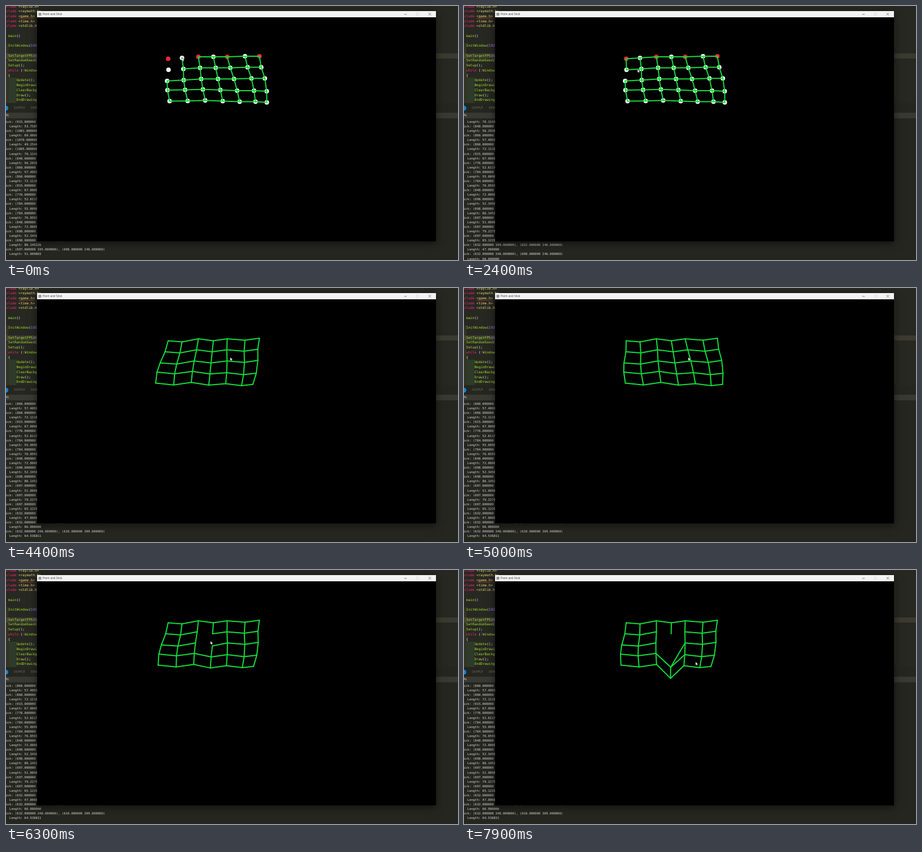
An HTML page with a canvas for the animation above (8 s loop, 800 by 450 pixels).

```html
<!DOCTYPE html>
<html lang="en">
<head>
<meta charset="utf-8">
<title>Point and Stick</title>
<style>
  html, body { margin: 0; width: 100%; height: 100%; overflow: hidden; background: #272822; }
  canvas { display: block; width: 800px; height: 450px; }
</style>
</head>
<body>
<canvas id="stage" width="800" height="450"></canvas>
<script>
const g = document.getElementById('stage').getContext('2d');
const LOOP = 8000, COLS = 7, ROWS = 5, PLAY = 3300;
const MONO = '"DejaVu Sans Mono", "Noto Sans Mono", monospace';
const SANS = '"Open Sans", "Noto Sans", sans-serif';
const WHITE = '#f8f8f2', PINK = '#f92672', YELLOW = '#e6db74', GREEN = '#a6e22e',
      CYAN = '#66d9ef', PURPLE = '#ae81ff';

// Top and bottom edge of the cloth; the rows between are interpolated.
const topX = [287, 311.5, 340.5, 367, 391.5, 423, 448.5];
const topY = [93.5, 92, 90, 90, 90, 89, 89];
const bottomX = [282, 314, 345, 376, 406, 434, 454];

// Sticks drawn by hand: from point, to point, time.
const drawn = [[1, 2, 400], [1, 0, 1000], [0, 7, 1600], [7, 8, 2300], [7, 14, 2950]];
const born = Object.fromEntries(drawn.map(([a, b, t]) => [Math.min(a, b) + '-' + Math.max(a, b), t]));
const cut = { '9-10': 5700, '16-17': 5950, '10-17': 6150, '10-11': 6350 };

// The halves swing together until the cloth is torn.
const swing = [[PLAY, -.45], [4390, 1.02], [5160, -.35], [6090, 1]];
const leftSwing = [...swing, [7050, -1.1], [7890, .25]];
const rightSwing = [...swing, [7050, .5], [7890, 1]];
const settle = [[PLAY, 0], [3600, 1]];
const fall = [[6150, 0], [6950, 1]];
const mouse = [
  ...drawn.flatMap(([a, b, t]) => [[t - 350, ...point(a, 0)], [t, ...point(b, 0)]]),
  [3650, 397, 123], [5200, 397, 123], [5580, 347.5, 110.5], [6100, 360, 130],
  [6950, 375, 101], [7800, 410, 163]];

const early = [[915, 53.758720], [1001, 69], [1070, 49.254441], [1005, 70.114193], [848, 56.293873],
  [860, 57.489129], [860, 72.111026], [915, 67], [776, 52.611786], [784, 55.009090],
  [784, 76.059187], [848, 72], [698, 52.345009]];
const late = [[698, 246, 784, 241], [697, 195, 698, 246], [697, 195, 776, 189], [697, 195, 632, 199],
  [632, 199, 632, 246], [632, 246, 698, 246], [632, 246, 618, 309]];
const six = n => n.toFixed(6);
const log = [
  ...early.flatMap(([x, length]) => [`ick: (${six(x)}`, `  Length: ${six(length)}`]),
  ...late.flatMap(([x, y, u, v]) => [
    `ick: (${six(x)} ${six(y)}), (${six(u)} ${six(v)})`, `  Length: ${six(Math.hypot(u - x, v - y))}`])];

const include = name => [[PINK, '#include '], [YELLOW, `<${name}.h>`]];
const call = (indent, name, rest = '();', number = '') =>
  [[GREEN, ' '.repeat(indent) + name], [WHITE, rest], [PURPLE, number]];
const code = [
  ...['raylib', 'raymath', 'game', 'time', 'stdlib'].map(include), [],
  [[CYAN, 'int '], [GREEN, 'main'], [WHITE, '()']], [],
  call(4, 'InitWindow', '(', '1920'), [],
  call(4, 'SetTargetFPS', '(', '60'), call(4, 'SetRandomSeed', '('), call(4, 'Setup'),
  [[PINK, '    while '], [WHITE, '('], [PINK, '!'], [GREEN, 'Window']],
  [[WHITE, '    {']],
  ...['Update', 'BeginDrawing', 'ClearBackground', 'Draw', 'EndDrawing'].map(name => call(8, name))];

function lerp(a, b, k) {
  return a + (b - a) * k;
}

// Eased value of [time, ...values] keys, held at both ends.
function track(keys, t) {
  const n = keys.findIndex(key => key[0] > t);
  if (n < 1) return keys[n ? keys.length - 1 : 0].slice(1);
  const a = keys[n - 1], b = keys[n];
  const k = (1 - Math.cos(Math.PI * (t - a[0]) / (b[0] - a[0]))) / 2;
  return a.slice(1).map((v, i) => lerp(v, b[i + 1], k));
}

function point(i, t) {
  const c = i % COLS, r = (i - c) / COLS, side = c - 3;
  const [left] = track(leftSwing, t), [right] = track(rightSwing, t);
  const sway = side < 0 ? left : side > 0 ? right : (left + right) / 2;
  const bulge = 1.2 * side * Math.max(0, Math.sin(Math.PI * (r - 1) / 3));
  let x = lerp(topX[c], bottomX[c], r / 4) + bulge - 4.2 * r * sway;
  let y = topY[c] + 19.6 * r + (r > 2 ? 1.1 * side : 0);
  if (c % 2) y += 3.5 * track(settle, t)[0];  // only even columns are pinned
  if (!side && r > 1) {                       // the torn middle drops
    const [k] = track(fall, t);
    y += 20 * k;
    if (r === 2) x += 11 * k;
  }
  return [x, y];
}

function box(x, y, w, h, color) {
  g.fillStyle = color;
  g.fillRect(x, y, w, h);
}

function text(s, x, y, color, font) {
  g.font = font;
  g.fillStyle = color;
  g.fillText(s, x, y);
  return x + g.measureText(s).width;
}

function disc(x, y, r, color) {
  g.fillStyle = color;
  g.beginPath();
  g.arc(x, y, r, 0, 7);
  g.fill();
}

function line(...p) {
  g.beginPath();
  for (let i = 0; i < p.length; i += 2) g.lineTo(p[i], p[i + 1]);
  g.stroke();
}

function drawEditor(t) {
  box(0, 0, 800, 450, '#272822');
  box(0, 84, 800, 9, '#3a3a30');
  box(0, 66, 4.5, 106, 'rgba(255,255,64,.05)');
  box(4.5, 127, 14, 45, 'rgba(127,255,127,.09)');
  code.forEach((parts, i) => {
    let x = -10.4;
    for (const [color, s] of parts) x = text(s, x, 1 + i * 8.72, color, '6px ' + MONO);
  });
  box(22, 21.6, 29, .7, '#d03030');

  box(0, 172, 800, 278, '#25261f');
  disc(0, 181, 4.2, '#1682d4');
  text('OUTPUT', 14, 181, '#77786f', '5px ' + SANS);
  text('DEBUG CONSOLE', 44, 181, '#77786f', '5px ' + SANS);
  box(0, 189, 800, 10, '#383933');
  text('AL', -.5, 194, '#e0e0dc', '5px ' + SANS);

  const added = drawn.filter(stick => t >= stick[2]).length;
  const first = added === 4 ? 7 : 2 * added;
  log.slice(first, 30 + 2 * added).forEach((s, i) =>
    text(s, -.5, 205.5 + i * 8.086, '#d6d6d6', '5.5px ' + MONO));
}

function drawWindow() {
  g.save();
  g.shadowColor = 'rgba(0,0,0,.55)';
  g.shadowBlur = 14;
  g.shadowOffsetY = 3;
  box(55, 9, 706, 408, '#000');
  g.restore();
  box(55, 9, 706, 11, '#f3f3f3');
  box(57.5, 12, 5, 5, '#999');
  text('Point and Stick', 65, 14.8, '#333', '5px ' + SANS);
  g.lineWidth = .7;
  g.strokeStyle = '#555';
  line(705, 14.8, 709, 14.8);
  line(748, 12.4, 752, 16.4);
  line(752, 12.4, 748, 16.4);
  g.strokeStyle = '#d8d8d8';
  g.strokeRect(726.5, 12.5, 4, 4);
}

function drawCloth(t) {
  const points = Array.from({ length: COLS * ROWS }, (_, i) => point(i, t));
  if (t < PLAY) points.forEach(([x, y], i) =>
    disc(x, y, 4, i < COLS && i % 2 === 0 ? '#e62937' : '#f5f5f5'));
  g.strokeStyle = '#14dc3c';
  g.lineWidth = 2;
  const stick = (a, b) => {
    const key = a + '-' + b;
    if (t >= (born[key] || 0) && t < (cut[key] || LOOP)) line(...points[a], ...points[b]);
  };
  points.forEach((_, i) => {
    if (i % COLS < COLS - 1) stick(i, i + 1);
    if (i + COLS < points.length) stick(i, i + COLS);
  });
}

function drawMouse(t) {
  g.save();
  g.translate(...track(mouse, t));
  g.beginPath();
  for (const p of [[0, 0], [0, 5.4], [1.3, 4.3], [2.2, 6.3], [3.1, 5.9], [2.2, 4], [3.9, 3.9]]) g.lineTo(...p);
  g.closePath();
  g.lineWidth = .8;
  g.strokeStyle = '#222';
  g.stroke();
  g.fillStyle = '#eee';
  g.fill();
  g.restore();
}

function draw(now) {
  const t = now % LOOP;
  g.textBaseline = 'middle';
  g.lineCap = 'round';
  drawEditor(t);
  drawWindow();
  drawCloth(t);
  drawMouse(t);
  requestAnimationFrame(draw);
}
requestAnimationFrame(draw);
</script>
</body>
</html>
```
